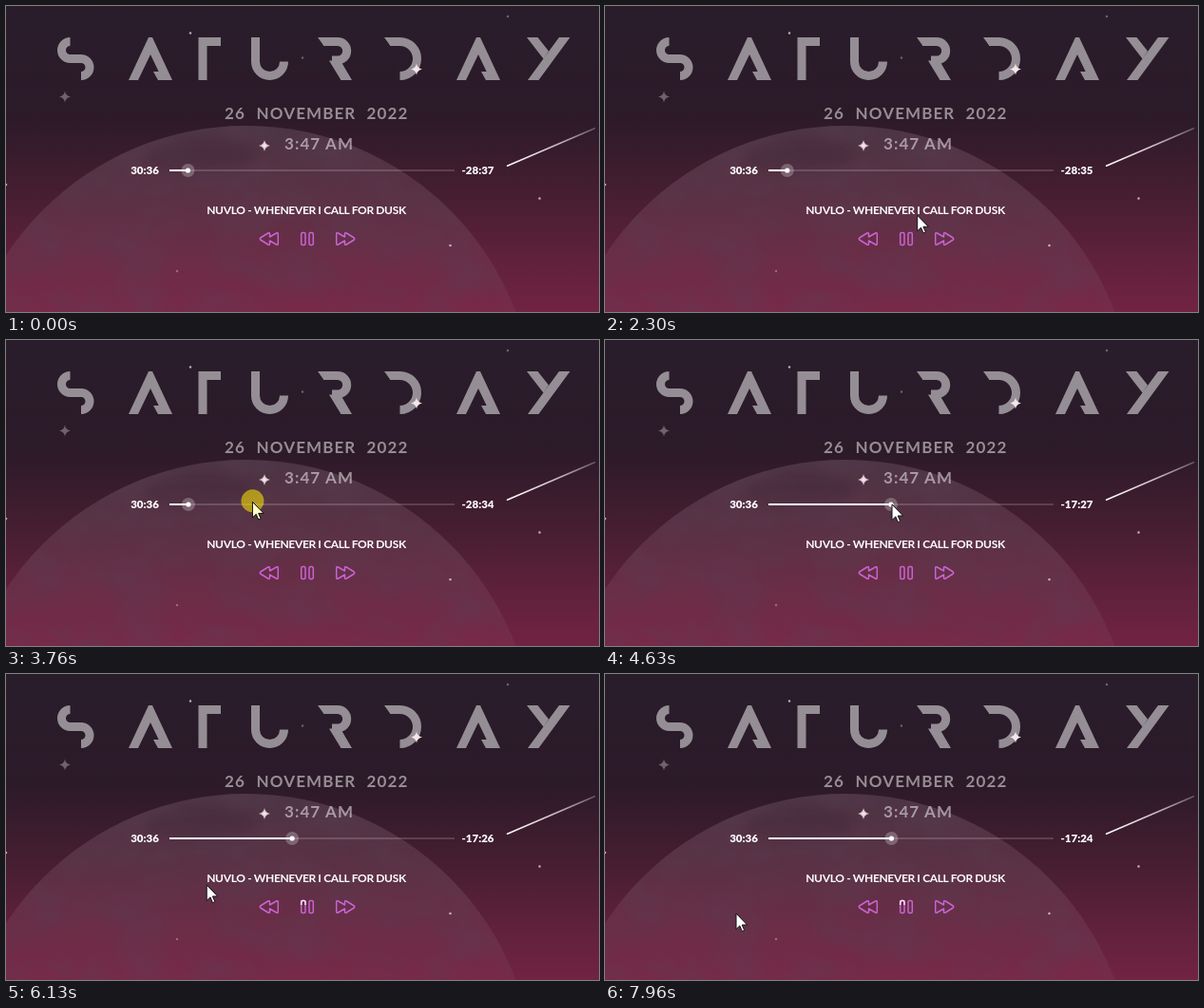
An HTML page that plays this animation: 624 by 322 pixels, repeating every 7.99 s.

```html
<!DOCTYPE html>
<html lang="en">
<head>
<meta charset="utf-8">
<title>Night player</title>
<style>
  html, body { margin: 0; width: 100%; height: 100%; overflow: hidden; background: #2a1b29; }
  svg { display: block; width: 100vw; height: 100vh; }
  text { font-family: Lato, "Open Sans", sans-serif; font-weight: 700; fill: #fff; text-anchor: middle; }
  .title { fill: #fff; opacity: .5; }
  .line { fill: none; stroke: #fff; stroke-width: 9; }
  .date { opacity: .5; }
  .date text { font-size: 17px; letter-spacing: 1.1px; }
  .time { font-size: 11.5px; font-weight: 900; }
  .song { font-size: 12px; letter-spacing: -.35px; }
  .icons { fill: none; stroke: #cb62d2; stroke-width: 1.5; stroke-linejoin: round; }
  .dots { fill: none; stroke: #eadbe1; stroke-width: 2.6; stroke-linecap: round; }
  .cursor { fill: #fff; stroke: #111; stroke-width: 1; stroke-linejoin: round; }
  .held { fill: #ffffc4; }
</style>
</head>
<body>
<svg viewBox="0 0 624 322" preserveAspectRatio="none">
  <defs>
    <linearGradient id="sky" x2="0" y2="1">
      <stop offset="0" stop-color="#291d2b"/>
      <stop offset=".36" stop-color="#2c1a29"/>
      <stop offset=".6" stop-color="#441e30"/>
      <stop offset=".82" stop-color="#5f213b"/>
      <stop offset="1" stop-color="#712342"/>
    </linearGradient>
    <linearGradient id="moonFill" gradientUnits="userSpaceOnUse" x1="0" y1="126" x2="0" y2="322">
      <stop offset="0" stop-color="#dcb4c6" stop-opacity=".17"/>
      <stop offset=".5" stop-color="#cf9fb2" stop-opacity=".13"/>
      <stop offset="1" stop-color="#c0748e" stop-opacity=".08"/>
    </linearGradient>
    <linearGradient id="trail" gradientUnits="userSpaceOnUse" x1="528" y1="168" x2="620" y2="129">
      <stop offset="0" stop-color="#fff"/>
      <stop offset=".5" stop-color="#e4d6dc" stop-opacity=".9"/>
      <stop offset="1" stop-color="#fff" stop-opacity=".25"/>
    </linearGradient>
    <filter id="soft" x="-50%" y="-50%" width="200%" height="200%"><feGaussianBlur stdDeviation="6"/></filter>
    <filter id="mottle" x="0" y="0" width="100%" height="100%">
      <feTurbulence type="fractalNoise" baseFrequency=".018 .03" numOctaves="3" seed="4"/>
      <feColorMatrix values="0 0 0 0 .1  0 0 0 0 .05  0 0 0 0 .09  .7 0 0 0 -.25"/>
    </filter>
    <clipPath id="disc"><circle cx="253" cy="429" r="303"/></clipPath>
    <path id="spark" d="M0-6Q.8-.8 6 0Q.8.8 0 6Q-.8.8-6 0Q-.8-.8 0-6Z"/>
    <g id="A">
      <path d="M-23 78L-2 33H2L23 78H13L0 51L-13 78Z"/>
      <path d="M3 69H10L14 78H8Z"/>
    </g>
  </defs>

  <rect width="624" height="322" fill="url(#sky)"/>
  <circle cx="253" cy="429" r="303" fill="url(#moonFill)"/>
  <g clip-path="url(#disc)">
    <rect y="126" width="560" height="196" filter="url(#mottle)"/>
    <ellipse cx="205" cy="158" rx="56" ry="17" fill="#2a1628" opacity=".16" filter="url(#soft)"/>
  </g>

  <path d="M527.5 168.300L619.500 128.800" stroke="url(#trail)" stroke-width="1.500" stroke-linecap="round"/>

  <g class="title" role="img" aria-label="SATURDAY">
    <path class="line" d="M67.500 37.500a8.900 8.900 0 0 0 0 18H79a9 9 0 0 1 0 18"/>
    <use href="#A" x="152"/>
    <path class="line" d="M226 37.500H207V78"/>
    <path class="line" d="M262.500 33V58.500a15 15 0 0 0 30 0"/>
    <path class="line" d="M334 37.500H349a9.700 9.700 0 0 1 0 19.400H343"/>
    <path d="M328 33H334.500V42ZM340 57.500H352L364 78H352.500Z"/>
    <path class="line" d="M404 37.500H414.500a18 18 0 0 1 0 36"/>
    <path d="M398 33H404.500V42Z"/>
    <use href="#A" x="497"/>
    <path d="M582 33H593.500L560.500 78H549ZM548 33H559.500L571 47.500L565.500 55.500Z"/>
  </g>

  <g fill="#f6e6ea">
    <use href="#spark" x="62" y="95.500" opacity=".35"/>
    <use href="#spark" x="432" y="66.500"/>
    <use href="#spark" x="272" y="147" opacity=".85"/>
    <circle cx="432" cy="66.500" r="2.200"/>
    <circle cx="272" cy="147" r="1.800"/>
  </g>
  <path class="dots" opacity=".75" d="M194 28.500h0M561.500 202.500h0M467.500 252h0M0 188h0"/>
  <path class="dots" opacity=".35" d="M312 54.500h0M528 11h0M180 279h0"/>

  <g class="date">
    <text x="241" y="119">26</text>
    <text x="316" y="119">NOVEMBER</text>
    <text x="401.500" y="119">2022</text>
    <text x="329.500" y="151">3:47 AM</text>
  </g>

  <text class="time" x="146" y="177">30:36</text>
  <text class="time" id="left" x="496.500" y="177">-28:37</text>
  <rect x="172" y="172" width="300" height="2" fill="#fff" opacity=".16"/>
  <rect id="played" x="172" y="172" width="19" height="2" fill="#fff"/>
  <g id="knob" fill="#fff">
    <circle r="7" opacity=".25"/>
    <circle r="2.600"/>
  </g>

  <text class="song" x="316" y="219">NUVLO - WHENEVER I CALL FOR DUSK</text>

  <g class="icons">
    <path id="skip" d="M347.700 240Q347.700 238 349.500 239L356.500 243V240Q356.500 238 358.300 239L366.300 244Q367.300 245 366.300 246L358.300 251Q356.500 252 356.500 250V247L349.500 251Q347.700 252 347.700 250Z"/>
    <use href="#skip" transform="translate(634 0) scale(-1 1)"/>
    <rect x="310.700" y="238.500" width="4.300" height="13" rx="1.500"/>
    <rect x="319" y="238.500" width="4.300" height="13" rx="1.500"/>
    <path id="glint" d="M310.700 243V240Q310.700 238.500 312.200 238.500H313.500Q315 238.500 315 240V243" stroke="#f6e4f8"/>
  </g>

  <g id="cursor" class="cursor">
    <circle id="press" cy="-1" r="12" fill="#f5e205" stroke="none" opacity=".58"/>
    <path id="arrow" d="M0 0V16.500L3.800 12.900L6.300 18.700L8.700 17.600L6.200 12H11.600Z"/>
    <path id="hand" transform="translate(-7.500 0)" d="M5 13V2.200a1.800 1.800 0 0 1 3.600 0V8a1.700 1.700 0 0 1 3.300.6a1.600 1.600 0 0 1 3.100.7a1.500 1.500 0 0 1 2.900 1V15c0 3-1.500 4-1.800 7.500H7C6 19 2.500 15.500 1 13c-1-2 1-3 2.500-1.500z"/>
  </g>
</svg>
<script>
const LOOP = 7990, LENGTH = 1836, SEEK = 4150;
const $ = id => document.getElementById(id);
const show = (id, on) => { $(id).style.display = on ? '' : 'none'; };
const within = (t, a, b) => t >= a && t < b;

// Pointer strokes: begin, end, route, pace (above 1 starts slowly); it rests in between
const strokes = [
  [280, 1020, 'M546 322Q400 290 316 243', .8],
  [2150, 2930, 'M316 243C370 225 300 200 187 177', 1],
  [3220, 3940, 'M187 177Q230 166 302 173', 1.6],
  [4630, 5420, 'M302 173C380 190 370 224 300 224S118 210 118 168Q118 135 142 122', .7],
  [5470, 6260, 'M142 122C180 100 275 100 275 160Q275 218 212 222L136 218', 1.4],
  [6310, 6470, 'M136 218Q75 180 106 133', 1],
  [6630, 7190, 'M106 133C200 110 200 218 140 216Q90 218 68 205', 1],
  [7340, 7400, 'M68 205L79 208', 1],
  [7590, 7960, 'M79 208L138 252', 1]
].map(([begin, end, d, pace]) => {
  const route = document.createElementNS('http://www.w3.org/2000/svg', 'path');
  route.setAttribute('d', d);
  return { begin, end, route, pace, size: route.getTotalLength() };
});

function pointer(t) {
  const s = strokes.filter(k => k.begin <= t).pop() || strokes[0];
  const u = Math.min(1, Math.max(0, (t - s.begin) / (s.end - s.begin)));
  return s.route.getPointAtLength(s.size * u ** s.pace);
}

// Seconds still to play; the display lags behind real seconds
function remaining(t) {
  return t < SEEK
    ? 1717 - Math.floor((t + 1020) / 1320)
    : 1047 - Math.max(0, Math.floor((t - 4390) / 1080));
}

function draw(t) {
  const rest = remaining(t);
  const width = 300 * (LENGTH - rest) / LENGTH;
  $('left').textContent = `-${Math.floor(rest / 60)}:${String(rest % 60).padStart(2, '0')}`;
  $('played').setAttribute('width', width);
  $('knob').setAttribute('transform', `translate(${172 + width} 173)`);

  const { x, y } = pointer(t);
  const held = within(t, 3300, 4050);
  const hand = within(t, 1000, 2210) || within(t, 2880, 3290);
  $('cursor').setAttribute('transform', `translate(${x} ${y})`);
  $('arrow').classList.toggle('held', held);
  show('cursor', t >= 280);
  show('press', held);
  show('hand', hand);
  show('arrow', !hand);
  show('glint', t >= 4900);
}

let start;
function loop(now) {
  start ??= now;
  draw((now - start) % LOOP);
  requestAnimationFrame(loop);
}
draw(0);
requestAnimationFrame(loop);
</script>
</body>
</html>
```
